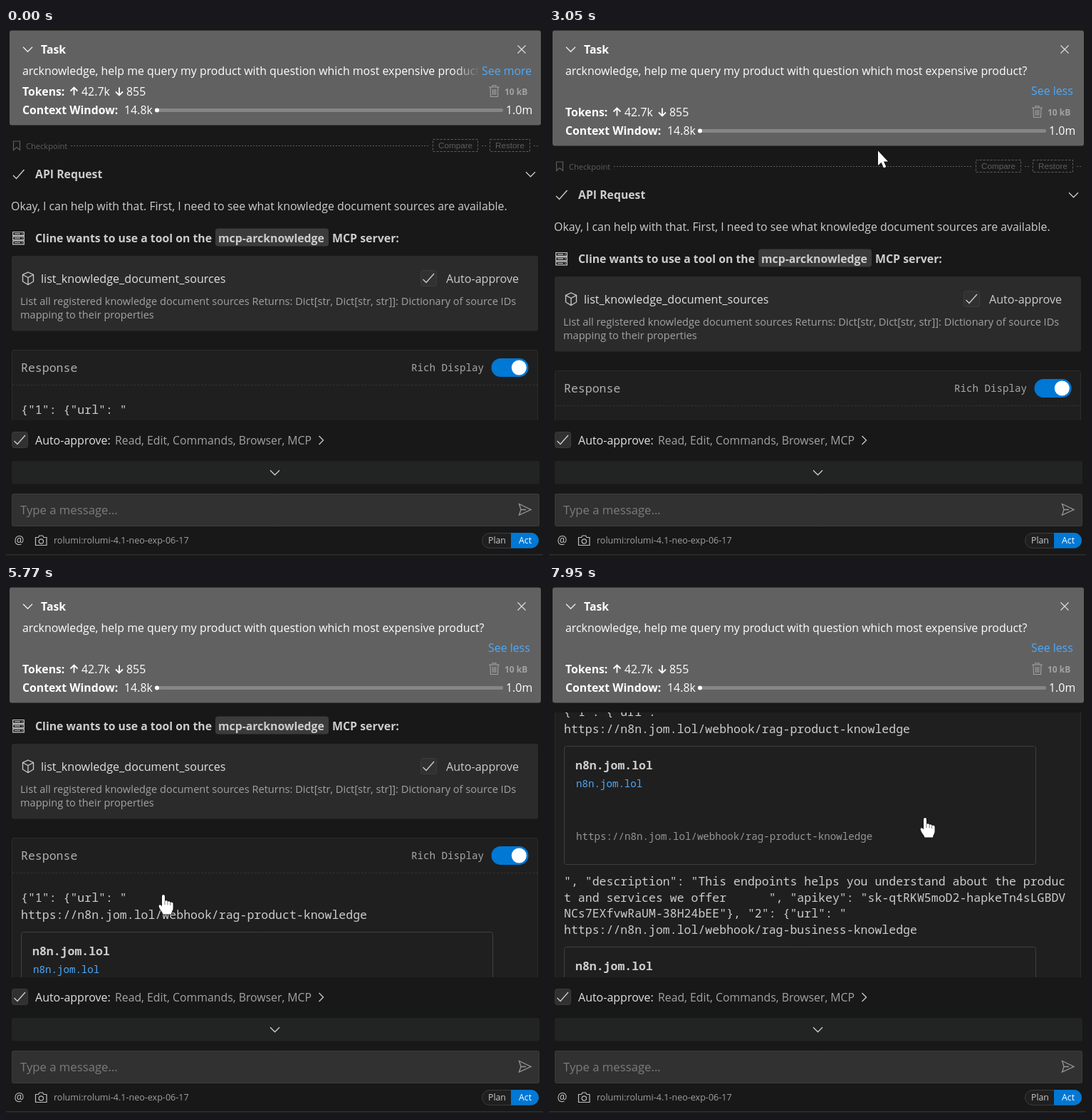
These frames come from a looping animation (754 px wide and 743 px high, 8 s). An HTML page with a canvas:

```html
<!DOCTYPE html>
<html lang="en">
<head>
<meta charset="utf-8">
<title>Assistant panel</title>
<style>
html, body { margin: 0; width: 100%; height: 100%; overflow: hidden; background: #181818; }
canvas { display: block; width: 754px; height: 743px; }
</style>
</head>
<body>
<canvas id="stage"></canvas>
<script>
const W = 754, H = 743, LOOP = 8000;
const canvas = document.getElementById('stage');
const c = canvas.getContext('2d');
const dpr = window.devicePixelRatio || 1;
canvas.width = W * dpr;
canvas.height = H * dpr;

const SANS = '"Open Sans", "Noto Sans", sans-serif';
const MONO = '"Noto Sans Mono", "DejaVu Sans Mono", monospace';
const ARIAL = '"Liberation Sans", sans-serif';
const BG = '#181818', FG = '#cccccc', DIM = '#a3a3a3', SOFT = '#a2a2a2';
const BLUE = '#0078d4', LINK = '#4daafc', HEAD = '#616161', EDGE = '#3c3c3c';

const ENTER_AT = 70, EXPAND_AT = 2580;
const GROW = 29;
const NOTCH = 129, NOTCH_MS = 350;
const notches = [5450, 6000, 7490];

// Pointer legs: from, to (ms), then where the leg ends
const legs = [
  { a: 70, b: 860, x: 275, y: 88 },
  { a: 920, b: 1320, x: 237, y: 88 },
  { a: 1460, b: 2190, x: 701, y: 58 },
  { a: 2640, b: 3400, x: 275, y: 262 },
  { a: 3400, b: 3970, x: 482, y: 309 },
  { a: 3970, b: 4110, x: 482, y: 372 },
  { a: 4110, b: 4500, x: 391, y: 403 },
  { a: 4900, b: 5770, x: 221, y: 435 },
  { a: 5770, b: 6570, x: 349, y: 370 },
  { a: 6900, b: 7160, x: 533, y: 307 },
  { a: 7490, b: 7950, x: 528, y: 327 }
];

function ease(t, a, b) {
  const k = Math.min(1, Math.max(0, (t - a) / (b - a)));
  return k * k * (3 - 2 * k);
}
function pointerAt(t) {
  const p = { x: 733, y: 606 };
  for (const leg of legs) {
    const k = ease(t, leg.a, leg.b);
    p.x += (leg.x - p.x) * k;
    p.y += (leg.y - p.y) * k;
  }
  return p;
}
const scrollAt = t => notches.reduce((sum, s) => sum + NOTCH * ease(t, s, s + NOTCH_MS), 0);

// The web address and its preview card are clickable
const overLink = (x, y) => y > 528 && y < 750 && x < (y < 584 ? 508 : 684);

function text(s, x, y, size = 15.9, color = FG, weight = 400, family = SANS) {
  c.font = `${weight} ${size}px ${family}`;
  c.fillStyle = color;
  c.fillText(s, x, y);
}
const bold = (s, x, y, color = FG, size = 15.8) => text(s, x, y, size, color, 700);
const mono = (s, x, y, size = 16.55, color = FG, weight = 400) => text(s, x, y, size, color, weight, MONO);

function box(x, y, w, h, r, fill, stroke) {
  c.beginPath();
  c.roundRect(x, y, w, h, r);
  if (fill) { c.fillStyle = fill; c.fill(); }
  if (stroke) { c.strokeStyle = stroke; c.lineWidth = 1; c.stroke(); }
}
function dot(x, y, r, color) {
  c.beginPath();
  c.arc(x, y, r, 0, Math.PI * 2);
  c.fillStyle = color;
  c.fill();
}
function icon(d, x, y, color = FG, width = 1.3) {
  c.save();
  c.translate(x, y);
  c.strokeStyle = color;
  c.lineWidth = width;
  c.stroke(new Path2D(d));
  c.restore();
}
function dashes(pattern, x0, x1, y, color) {
  c.setLineDash(pattern);
  icon(`M0 0H${x1 - x0}`, x0, y, color, 1);
  c.setLineDash([]);
}
const chevron = (x, y, color = FG) => icon('M-6.5-3.2L0 3.3L6.5-3.2', x, y, color);
const tick = (x, y) => icon('M-7.5 1.5L-3 6L8-6.5', x, y, FG, 1.4);
function checkbox(x, y) {
  box(x + .5, y + .5, 22, 22, 3, '#313131', EDGE);
  tick(x + 11, y + 11.5);
}

function header(open) {
  const d = open ? GROW : 0;
  box(5, 3.5, 746, 133 + d, 3, HEAD);
  chevron(30.5, 30, '#eee');
  bold('Task', 49, 36, '#fff');
  icon('M-5.5-5.5L5.5 5.5M5.5-5.5L-5.5 5.5', 724, 30, '#ddd', 1.2);

  c.save();
  c.beginPath();
  c.rect(20, 44, 722, 26);
  c.clip();
  text('arcknowledge, help me query my product with question which most expensive product?', 23, 66, 15.9, '#fff');
  if (!open) {
    const fade = c.createLinearGradient(628, 0, 665, 0);
    fade.addColorStop(0, 'rgba(97,97,97,0)');
    fade.addColorStop(1, HEAD);
    c.fillStyle = fade;
    c.fillRect(628, 44, 114, 26);
  }
  c.restore();
  if (open) text('See less', 677, 94, 15.9, LINK);
  else text('See more', 668, 66, 15.9, LINK);

  c.save();
  c.translate(0, d);
  bold('Tokens:', 23, 94.5, '#fff');
  icon('M0 5.5V-5.5M-5-.5L0-5.5L5-.5', 95.5, 89, '#fff', 1.8);
  text('42.7k', 106, 94.5, 15.9, '#fff');
  icon('M0-5.5V5.5M-5 .5L0 5.5L5 .5', 159, 89, '#fff', 1.8);
  text('855', 169, 94.5, 15.9, '#fff');
  icon('M0 3H15M5 3V.7H10V3M2 3L2.5 16.5H12.5L13 3M5.3 6V14M7.5 6V14M9.7 6V14', 678, 80, SOFT, 1.1);
  bold('10 kB', 700, 93.5, SOFT, 12);
  bold('Context Window:', 23, 121, '#fff');
  text('14.8k', 166, 121, 15.9, '#fff');
  box(209, 113, 489, 5, 2, '#868686');
  dot(212, 115.4, 3, '#fff');
  text('1.0m', 702, 121, 15.9, '#fff');
  c.restore();
}

function checkpoint(hover) {
  const col = '#b4b4b4';
  c.globalAlpha = hover ? 1 : .45;
  icon('M0 0H9V12.5L4.5 8.5L0 12.5Z', 10.5, 159, col, 1.2);
  text('Checkpoint', 28, 169.5, 11.1, col);
  dashes([2, 2], 91, 594, 165.5, col);
  dashes([2, 2], 668, 675, 165.5, col);
  dashes([2, 2], 741, 748, 165.5, col);
  c.setLineDash([3, 2]);
  box(599.5, 156.5, 63, 17, 0, null, col);
  box(679.5, 156.5, 56, 17, 0, null, col);
  c.setLineDash([]);
  text('Compare', 607, 168.5, 11.7, col, 400, ARIAL);
  text('Restore', 687, 169, 11.7, col, 400, ARIAL);
  c.globalAlpha = 1;
}

function toolCard() {
  for (let i = 0; i < 3; i++) {
    icon('M0 0H15.6V4.8H0ZM2.3 2.4H10.3M12.3 2.4H13.8', 9.7, 286.5 + i * 6.3, FG, 1.2);
  }
  bold('Cline wants to use a tool on the', 41, 301);
  box(294, 281.5, 159, 25, 4, '#3b3b3b');
  bold('mcp-arcknowledge', 298, 301);
  bold('MCP server:', 458, 301, FG, 15.9);

  box(8, 320, 739, 105.5, 3, '#2b2b2b');
  icon('M0-9L7.5-5.5V4L0 8.5L-7.5 4V-5.5ZM-7.5-5.5L0-1.5L7.5-5.5M0-1.5V8.5', 31, 352);
  text('list_knowledge_document_sources', 49, 357.5, 16.15, '#e0e0e0', 500);
  checkbox(582, 340);
  text('Auto-approve', 618, 357.5, 16.1);
  text('List all registered knowledge document sources Returns: Dict[str, Dict[str, str]]: Dictionary of source IDs', 20, 388.5, 14.58, DIM);
  text('mapping to their properties', 20, 407.5, 14.58, DIM);
}

function linkCard(y, url) {
  box(21.5, y + .5, 662, 166, 3, null, '#404040');
  mono('n8n.jom.lol', 37, y + 32.5, 16.5, FG, 700);
  mono('n8n.jom.lol', 38, y + 58, 14.15, LINK);
  mono(url, 38, y + 132, 14.17, '#959595');
}

function response() {
  const host = 'https://n8n.jom.lol/webhook/rag-';
  box(8.5, 452.5, 738, 700, 3, '#1f1f1f', '#2d2d2d');
  mono('Response', 21, 483, 16.55, '#b0b0b0');
  mono('Rich Display', 569, 482, 14.17, '#a8a8a8');
  box(681.5, 464, 52, 26, 13, BLUE);
  dot(720.3, 477, 10.5, '#fff');
  dashes([3, 2], 9, 746, 501.5, '#333');
  mono('{"1": {"url": "', 21, 542);
  mono(host + 'product-knowledge', 21, 565.5);
  linkCard(584, host + 'product-knowledge');
  const lines = [
    '", "description": "This endpoints helps you understand about the produc',
    't and services we offer      ", "apikey": "sk-qtRKW5moD2-hapkeTn4sLGBDV',
    'NCs7EXfvwRaUM-38H24bEE"}, "2": {"url": "',
    host + 'business-knowledge'
  ];
  lines.forEach((s, i) => mono(s, 21, 780 + i * 22.6));
  linkCard(866, host + 'business-knowledge');
}

function chat(open, shift, hover) {
  const top = open ? 179 : 150;
  c.save();
  c.beginPath();
  c.rect(0, top, W, 551 - top);
  c.clip();
  c.translate(0, shift);
  checkpoint(hover);
  tick(17.5, 205.5);
  bold('API Request', 41, 211);
  chevron(736.5, 205.5);
  text('Okay, I can help with that. First, I need to see what knowledge document sources are available.', 7, 256);
  toolCard();
  response();
  c.restore();
}

function footer() {
  checkbox(8, 567);
  text('Auto-approve:', 41, 584.5, 16, '#e0e0e0');
  text('Read, Edit, Commands, Browser, MCP', 153, 584.5, 15.8, DIM);
  icon('M0-6L6 0L0 6', 439.5, 579);
  box(8, 608, 741, 32.5, 3, '#222423');
  chevron(377.5, 624.5);
  box(8.5, 654.5, 740, 45, 2, '#313131', EDGE);
  text('Type a message...', 20, 683, 16.7, '#7c7c7c');
  icon('M0-8L16.5 0L0 7.5L2.5 0ZM2.5 0H9.5', 720.5, 676.5, '#999');

  text('@', 11.5, 725, 15.5, '#c0c0c0');
  icon('M0 2.5H4L5.5 0H10L11.5 2.5H15.5V13.5H0ZM11 8A3.2 3.2 0 1 1 4.6 8A3.2 3.2 0 1 1 11 8', 41.5, 713, '#c0c0c0', 1.2);
  text('rolumi:rolumi-4.1-neo-exp-06-17', 67, 724, 12.56, '#a0a0a0');

  box(668.5, 709.5, 79, 21, 11, '#1f1f1f', EDGE);
  box(709, 709, 39, 21.5, [0, 11, 11, 0], BLUE);
  text('Plan', 677, 724.3, 12.3);
  text('Act', 720, 724.3, 12.3, '#fff');
  c.fillStyle = '#2f2f2f';
  c.fillRect(0, 739, W, 1.5);
}

const arrowShape = new Path2D('M0 0V20.5L4.6 16.2L8 24L11.4 22.5L8 15H14Z');
const handShape = new Path2D('M-2 2.2C-2-.6 2-.6 2 2.2V9C3 7.6 6 8 6 10C7 8.6 9.6 9 9.6 11.2C11 10 13.6 10.6 13.6 13V19C13.6 22 11.5 23.5 11 27.5H-.5C-1.5 24-5.5 20.5-6.3 16.5C-6.8 14-4 13.2-2 16.5Z');

function pointer(x, y, hand) {
  const shape = hand ? handShape : arrowShape;
  c.save();
  c.translate(x, y);
  c.lineJoin = 'round';
  c.lineWidth = 1.4;
  c.strokeStyle = '#111';
  c.fillStyle = '#fff';
  c.stroke(shape);
  c.fill(shape);
  if (hand) icon('M2 9V14M6 10V14.5M9.6 11.2V15', 0, 0, '#555', .8);
  c.restore();
}

function draw(t) {
  const open = t >= EXPAND_AT, shown = t >= ENTER_AT;
  const { x, y } = pointerAt(t);
  const shift = (open ? GROW : 0) - scrollAt(t);
  c.setTransform(dpr, 0, 0, dpr, 0, 0);
  c.fillStyle = BG;
  c.fillRect(0, 0, W, H);
  chat(open, Math.round(shift), shown && Math.abs(y - shift - 165) < 14);
  header(open);
  footer();
  if (shown) pointer(x, y, open && overLink(x, y - shift));
}

function loop() {
  draw(performance.now() % LOOP);
  requestAnimationFrame(loop);
}
loop();
</script>
</body>
</html>
```
